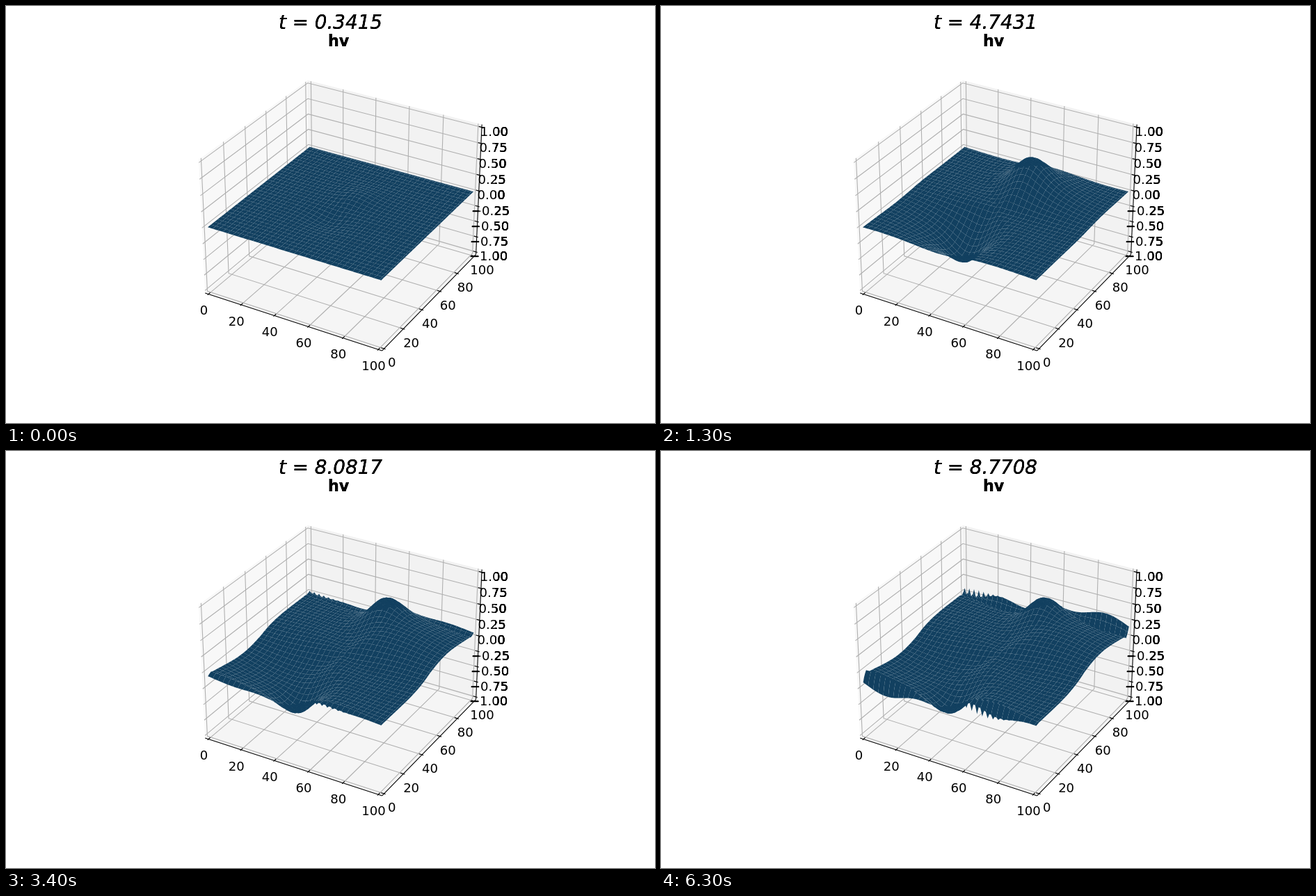
An HTML page with a canvas for the animation above (6.4 s loop, 933x600 px).

```html
<!DOCTYPE html>
<html>
<head>
<meta charset="utf-8">
<style>
  html, body { margin: 0; width: 100%; height: 100%; overflow: hidden; background: #fff; }
  canvas { display: block; }
</style>
</head>
<body>
<canvas id="stage" width="933" height="600"></canvas>
<script>
const ctx = document.getElementById('stage').getContext('2d');
const FRAME = 100, FRAMES = 64;
const HALF = 1.1905 / 2, HALF_Z = 0.8929 / 2, INSET = 0.96;
const TICKS = [0, 20, 40, 60, 80, 100];
const Z_TICKS = [-1, -0.75, -0.5, -0.25, 0, 0.25, 0.5, 0.75, 1];

// Simulation clock: [step, time, slope], joined by cubic Hermite pieces
const CLOCK = [[0, .3415, .336], [9, 3.363, .334], [18, 6.2522, .24], [26, 7.58, .095],
  [34, 8.0817, .045], [46, 8.4617, .023], [63, 8.7708, .0145]];

function clockAt(step) {
  let k = 0;
  while (k < CLOCK.length - 2 && step >= CLOCK[k + 1][0]) k++;
  const [s0, t0, m0] = CLOCK[k], [s1, t1, m1] = CLOCK[k + 1];
  const w = s1 - s0, u = (step - s0) / w, v = 1 - u;
  return t0 * v * v * (1 + 2 * u) + t1 * u * u * (3 - 2 * u) + w * u * v * (m0 * v - m1 * u);
}

// Box coordinates run from -1 to 1; elevation 30, azimuth -60, with perspective
function project(bx, by, bz) {
  const x = bx * HALF, y = by * HALF, z = bz * HALF_Z;
  const depth = 10 - (0.433 * x - 0.75 * y + 0.5 * z);
  const k = 2447 / depth;
  return [484.5 + k * (0.866 * x + 0.5 * y), 292.2 - k * (-0.25 * x + 0.433 * y + 0.866 * z), depth];
}
const toBox = v => (v / 50 - 1) * INSET;

const bell = d => Math.exp(-d * d / 2);
const swell = s => s * Math.exp((1 - s ** 2.5) / 2.5);

// Momentum at (x, y) in 0..100: a rotating dipole with two sharp crests,
// reflected at the y walls, where an instability grows
function momentum(x, y, t) {
  const X = x - 50, Y = y - 50, r = Math.hypot(X, Y);
  const amp = 0.47 * (1 - Math.exp(-t / 3.1));
  const R = 11 + 3.2 * t;
  const a = Math.atan2(Y, X) - (85 - 5 * t) * Math.PI / 180;
  const corner = 1 - 0.75 * Math.abs(X * Y) / 2500;
  const broad = swell(r / R) * (Math.cos(a) + 0.44 * Math.cos(3 * a)) / 1.44 * corner;
  const px = 0.11 * R, py = 0.99 * R;
  const crest = bell((X - px) / 9) * bell((Y - py) / 9.5) - bell((X + px) / 9) * bell((Y + py) / 9.5);
  const reflection = Math.sign(Y) * swell(50 / R) * Math.exp((Math.abs(Y) - 50) / 8) * (1 - X * X / 2500);
  return amp * (0.76 * broad + 0.78 * crest - 0.23 * reflection) + wall(x, y, t);
}

function wall(x, y, t) {
  const side = y < 50 ? -1 : 1, d = 50 - Math.abs(y - 50);
  if (d > 6) return 0;
  const u = side > 0 ? x : 100 - x;
  const spikes = 0.08 * bell((u - (side > 0 ? 6 : 33)) / 7) * Math.cos(u * 2 * Math.PI / 3);
  const shape = 0.22 * bell((u - 87) / 12) + 0.15 * bell((u - 24) / 10) + spikes;
  const layer = Math.exp(-d / 1.2) - 0.4 * bell((d - 3) / 0.8);
  return side * shape * layer * Math.exp((t - 8.77) * 1.9);
}

function path(points) {
  ctx.beginPath();
  for (const [x, y] of points) ctx.lineTo(x, y);
}
function polygon(points, color) {
  path(points);
  ctx.closePath();
  ctx.fillStyle = color;
  ctx.fill();
}
function line(color, ...corners) {
  path(corners.map(c => project(...c)));
  ctx.strokeStyle = color;
  ctx.lineWidth = 1.1;
  ctx.stroke();
}
function label(text, x, y, font, times = 1) {
  ctx.font = font + ' "DejaVu Sans", sans-serif';
  ctx.textAlign = 'center';
  ctx.fillStyle = '#000';
  for (let i = 0; i < times; i++) ctx.fillText(text, x, y);
}

function drawBox() {
  const pane = (color, ...corners) => polygon(corners.map(c => project(...c)), color);
  pane('#f8f8f8', [-1, -1, -1], [-1, 1, -1], [-1, 1, 1], [-1, -1, 1]);
  pane('#f2f2f2', [-1, 1, -1], [1, 1, -1], [1, 1, 1], [-1, 1, 1]);
  pane('#f5f5f5', [-1, -1, -1], [1, -1, -1], [1, 1, -1], [-1, 1, -1]);

  const grid = '#b0b0b0', ink = '#000';
  for (const v of TICKS) {
    const b = toBox(v);
    line(grid, [b, -1, -1], [b, 1, -1], [b, 1, 1]);
    line(grid, [1, b, -1], [-1, b, -1], [-1, b, 1]);
  }
  for (const v of Z_TICKS) line(grid, [-1, -1, v * INSET], [-1, 1, v * INSET], [1, 1, v * INSET]);

  line(ink, [-1, -1, -1], [1, -1, -1]);
  line(ink, [1, -1, -1], [1, 1, -1]);
  line(ink, [1, 1, -1], [1, 1, 1]);

  const out = 1.016, inner = 0.968, font = '18.06px';
  for (const v of TICKS) {
    const b = toBox(v);
    line(ink, [b, -out, -1], [b, -inner, -1]);
    line(ink, [out, b, -1], [inner, b, -1]);
    const [ax, ay] = project(b, -1, -1), [cx, cy] = project(1, b, -1);
    label(v, ax - 6.6, ay + 29.6, font);
    label(v, cx + 11.4, cy + 26.4, font);
  }
}

function drawZLabels() {
  const font = '18.06px';
  for (const v of Z_TICKS) {
    const z = v * INSET, [x, y] = project(1, 1, z);
    line('#000', [1.016, 1, z], [0.968, 1, z]);
    const text = v.toFixed(2).replace('-', '\u2212');
    label(text, x + 17.8, y + 12.4, font);
    // The right part and the minus sign are printed heavier
    ctx.save();
    ctx.beginPath();
    ctx.rect(703, 0, 230, 600);
    if (v < 0) ctx.rect(660, y, 20, 12);
    ctx.clip();
    label(text, x + 17.8, y + 12.4, font, 4);
    ctx.restore();
  }
}

// Patches span three cells, but their edges follow every node
function drawSurface(t) {
  const N = 100, STRIDE = 3, node = [];
  for (let i = 0; i <= N; i++) {
    node.push([]);
    for (let j = 0; j <= N; j++) node[i].push(project(toBox(i), toBox(j), momentum(i, j, t) * INSET));
  }
  const patches = [];
  for (let i = 0; i < N; i += STRIDE) {
    for (let j = 0; j < N; j += STRIDE) {
      const i2 = Math.min(i + STRIDE, N), j2 = Math.min(j + STRIDE, N), points = [];
      for (let k = i; k < i2; k++) points.push(node[k][j]);
      for (let k = j; k < j2; k++) points.push(node[i2][k]);
      for (let k = i2; k > i; k--) points.push(node[k][j2]);
      for (let k = j2; k > j; k--) points.push(node[i][k]);
      patches.push({ points, depth: points.reduce((sum, p) => sum + p[2], 0) / points.length });
    }
  }
  patches.sort((p, q) => q.depth - p.depth);
  for (const p of patches) polygon(p.points, '#124060');
}

const start = performance.now();
let shown = -1;
function tick() {
  const step = Math.floor((performance.now() - start) / FRAME) % FRAMES;
  if (step !== shown) {
    shown = step;
    const t = clockAt(step);
    ctx.fillStyle = '#fff';
    ctx.fillRect(0, 0, 933, 600);
    drawBox();
    drawSurface(t);
    drawZLabels();
    label('t = ' + parseFloat(t.toFixed(4)), 466.5, 33.3, 'italic 27.78px', 3);
    label('hv', 478.2, 57.8, 'bold 22.22px', 3);
  }
  requestAnimationFrame(tick);
}
tick();
</script>
</body>
</html>
```
